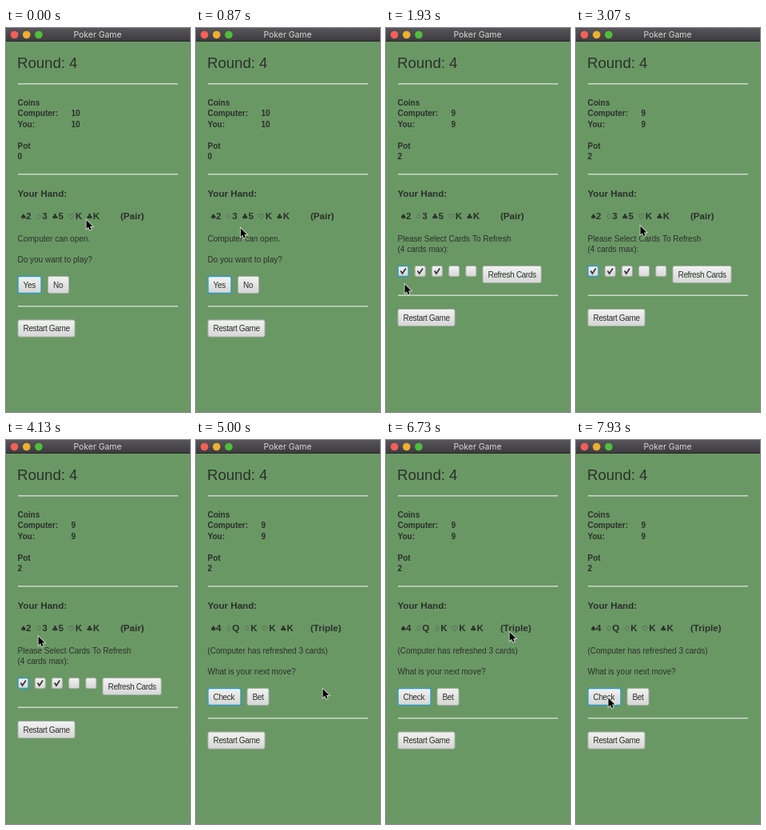
An HTML page with a canvas that plays this animation: 230 px wide and 480 px high, repeating every 8000 ms.

```html
<!DOCTYPE html>
<html lang="en">
<head>
<meta charset="utf-8">
<title>Poker Game</title>
<style>
  html, body { margin: 0; width: 100%; height: 100%; overflow: hidden; background: #6a9865; }
  canvas { display: block; width: 230px; height: 480px; }
</style>
</head>
<body>
<canvas id="stage"></canvas>
<script>
const LOOP = 8000;
const FPS = 15;
const INK = '#2b302b';
const SANS = '"Liberation Sans", Arial, sans-serif';

const canvas = document.getElementById('stage');
const ctx = canvas.getContext('2d');
const ratio = window.devicePixelRatio || 1;
canvas.width = 230 * ratio;
canvas.height = 480 * ratio;
ctx.scale(ratio, ratio);

// Pointer path: [time, x, y]
const path = [
  [0, 100, 239.5], [300, 158, 243], [650, 24, 314], [930, 60, 240],
  [1130, 118, 243], [1330, 118, 243], [1660, 23, 320], [2330, 23, 320],
  [2700, 20, 250], [3070, 80, 247], [3400, 14, 252], [3700, 70, 244],
  [3930, 40, 245], [4130, 40, 245], [4700, 158, 310.5], [5250, 158, 310.5],
  [5500, 110, 350], [5800, 26, 290], [6100, 58, 240], [6270, 154, 239.5],
  [6980, 154, 239.5], [7400, 18, 246], [7790, 63, 309], [7930, 40, 322]
];
const clicks = [[1660, 1925], [4740, 4990], [6460, 6725]];

const suitWidth = { '♠': 7, '♢': 8.2, '♣': 8, '♡': 9 };

function text(str, x, y, size = 10, weight = '', color = INK, family = SANS) {
  ctx.font = `${weight} ${size}px ${family}`;
  ctx.fillStyle = color;
  ctx.fillText(str, x, y);
}

const bold = (str, x, y, size = 10) => text(str, x, y, size, 'bold');

function rule(y) {
  ctx.fillStyle = '#cbd8c9';
  ctx.fillRect(15, y, 200, 1.5);
}

function panel(x, y, w, h, focused) {
  const fill = ctx.createLinearGradient(0, y, 0, y + h);
  fill.addColorStop(0, '#f3f3f3');
  fill.addColorStop(1, '#d4d5d4');
  ctx.beginPath();
  ctx.roundRect(x + .5, y + .5, w - 1, h - 1, 2);
  ctx.fillStyle = fill;
  ctx.fill();
  ctx.strokeStyle = focused ? '#2f9bc4' : '#a9b0a8';
  ctx.lineWidth = focused ? 1.4 : 1;
  ctx.stroke();
}

function button(label, x, y, w, focused) {
  panel(x, y, w, 22, focused);
  ctx.letterSpacing = '-0.33px';
  text(label, x + 7, y + 14.5);
  ctx.letterSpacing = '0px';
}

function checkbox(x, y, checked, focused) {
  panel(x, y, 14, 14, focused);
  if (!checked) return;
  ctx.beginPath();
  ctx.moveTo(x + 3.8, y + 6.5);
  ctx.lineTo(x + 6, y + 10);
  ctx.lineTo(x + 10.3, y + 3.5);
  ctx.strokeStyle = '#333';
  ctx.lineWidth = 1.7;
  ctx.stroke();
}

function hand(cards, rank) {
  let x = 18;
  for (const [suit, value] of cards.split(' ')) {
    text(suit, x - .5, 238.5, 9.5, '', INK, '"DejaVu Sans", sans-serif');
    x += suitWidth[suit];
    bold(value, x, 238.5, 11.6);
    x += ctx.measureText(value).width + 5.7;
  }
  bold(rank, 143, 238.5, 11.6);
}

function titleBar() {
  const shade = ctx.createLinearGradient(0, 0, 0, 17);
  shade.addColorStop(0, '#58565a');
  shade.addColorStop(1, '#3b393d');
  ctx.fillStyle = shade;
  ctx.fillRect(0, 0, 230, 17);
  ctx.fillStyle = '#262826';
  ctx.fillRect(0, 16, 230, 1);
  ['#f65f57', '#edb02f', '#4fbe3b'].forEach((color, i) => {
    ctx.beginPath();
    ctx.arc(10.5 + 15.2 * i, 8.5, 4.8, 0, 7);
    ctx.fillStyle = color;
    ctx.fill();
  });
  ctx.textAlign = 'center';
  text('Poker Game', 114.5, 12.3, 10.4, '', '#d8d7d8', 'Inter, sans-serif');
  ctx.textAlign = 'left';
}

function table(coins, pot) {
  text('Round: 4', 14, 50, 18.6);
  rule(69);
  bold('Coins', 14.5, 97);
  bold('Computer:', 14.5, 110);
  bold(coins, 81.5, 110);
  bold('You:', 14.5, 123.5);
  bold(coins, 81.5, 123.5);
  bold('Pot', 14.5, 151);
  bold(pot, 14.5, 164);
  rule(182);
  bold('Your Hand:', 14.5, 211, 11.6);
}

function footer(y) {
  rule(y);
  button('Restart Game', 14.5, y + 17.5, 72);
}

function openScreen() {
  table('10', '0');
  hand('♠2 ♢3 ♣5 ♡K ♣K', '(Pair)');
  text('Computer can open.', 14.5, 266.5);
  text('Do you want to play?', 14.5, 293);
  button('Yes', 14.5, 310, 30, true);
  button('No', 52, 310, 27);
  footer(347);
}

function refreshScreen() {
  table('9', '2');
  hand('♠2 ♢3 ♣5 ♡K ♣K', '(Pair)');
  text('Please Select Cards To Refresh', 14.5, 266.5);
  text('(4 cards max):', 14.5, 279.5);
  for (let i = 0; i < 5; i++) checkbox(14.5 + 21.2 * i, 297, i < 3, i === 0);
  button('Refresh Cards', 120.5, 297, 74);
  footer(333.5);
}

function betScreen() {
  table('9', '2');
  hand('♠4 ♢Q ♢K ♡K ♣K', '(Triple)');
  text('(Computer has refreshed 3 cards)', 14.5, 266.5);
  text('What is your next move?', 14.5, 293);
  button('Check', 14.5, 310, 42, true);
  button('Bet', 63.5, 310, 28);
  footer(347);
}

function pointerAt(t) {
  const next = path.findIndex(key => key[0] > t);
  if (next < 0) return path.at(-1).slice(1);
  const [t0, x0, y0] = path[next - 1];
  const [t1, x1, y1] = path[next];
  const u = (t - t0) / (t1 - t0);
  const k = u * u * (3 - 2 * u);
  return [x0 + (x1 - x0) * k, y0 + (y1 - y0) * k];
}

const arrow = new Path2D('M0 0V11L2.5 8.7L4.1 12.6L6.1 11.7L4.5 8H8Z');

function pointer(t) {
  const [x, y] = pointerAt(t);
  if (clicks.some(([start, end]) => t >= start && t < end)) {
    ctx.beginPath();
    ctx.arc(x + .7, y + 1, 17, 0, 7);
    ctx.strokeStyle = '#151a15';
    ctx.lineWidth = 1.3;
    ctx.stroke();
  }
  ctx.save();
  ctx.translate(x + .5, y + .5);
  ctx.strokeStyle = '#e8ece7';
  ctx.lineWidth = 1.5;
  ctx.stroke(arrow);
  ctx.fillStyle = '#000';
  ctx.fill(arrow);
  ctx.restore();
}

function draw(now) {
  const t = Math.floor(((now % LOOP) + 5) * FPS / 1000) * 1000 / FPS % LOOP;
  ctx.fillStyle = '#6a9865';
  ctx.fillRect(0, 0, 230, 480);
  titleBar();
  if (t < 1925) openScreen();
  else if (t < 4990) refreshScreen();
  else betScreen();
  pointer(t);
}

const start = performance.now();
function tick() {
  draw(performance.now() - start);
  requestAnimationFrame(tick);
}
tick();
</script>
</body>
</html>
```
